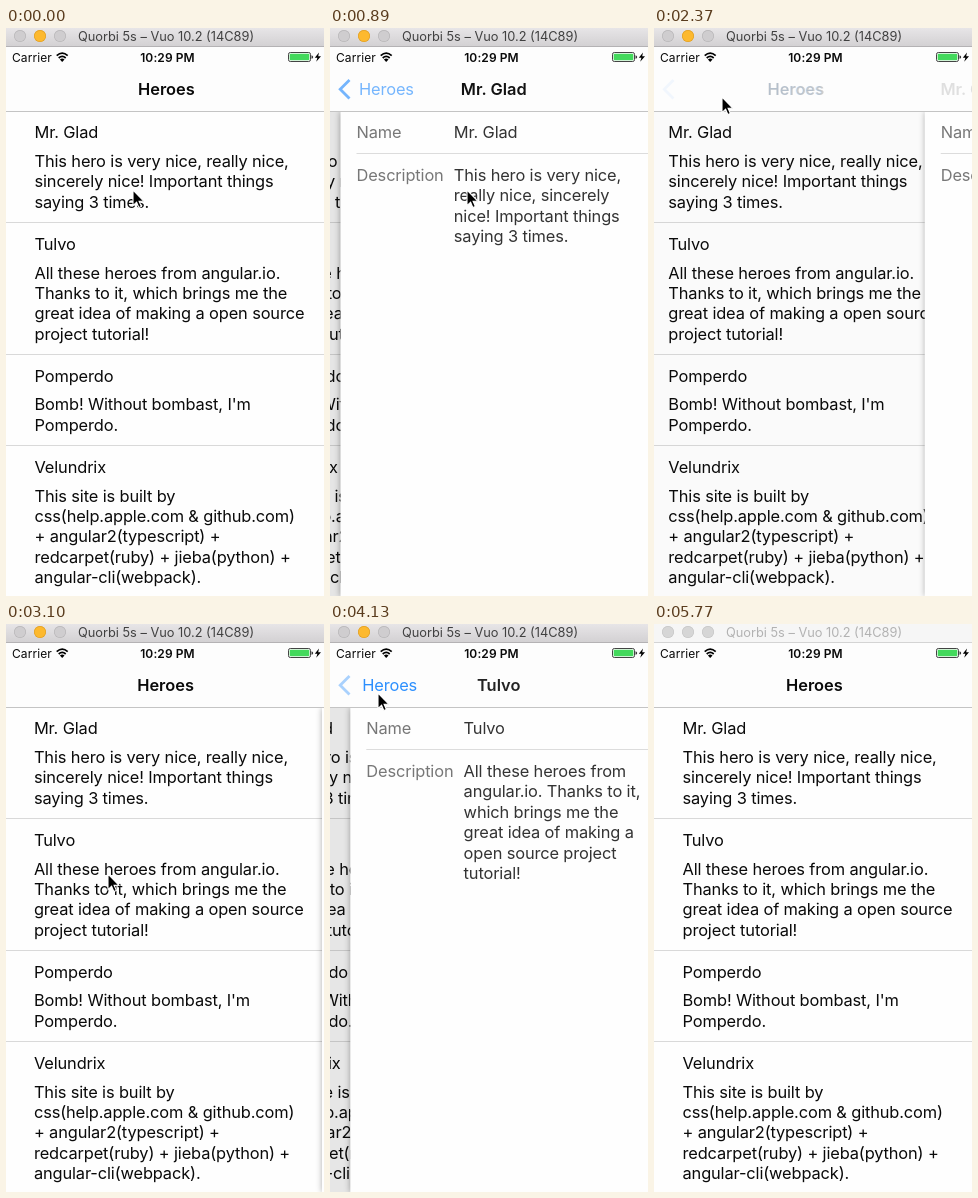
Write an HTML page that moves like this. It is 318 px wide and 568 px high and loops after 5870 ms.

```html
<!DOCTYPE html>
<html lang="en">
<head>
<meta charset="utf-8">
<title>Heroes</title>
<style>
html, body { margin: 0; width: 100%; height: 100%; overflow: hidden; background: #fff; }
#stage {
  position: relative; width: 318px; height: 568px; overflow: hidden; background: #fefefe;
  font: 16.4px/20.4px Inter, "Liberation Sans", sans-serif; letter-spacing: -.13px;
  color: #0a0a0a; white-space: pre;
}
#stage div, #stage svg { position: absolute; }

#list { left: 0; top: 83.2px; width: 318px; }
#list .row { position: static; padding: 11px 0 9.5px 28.5px; border-bottom: 1px solid #d9d9d9; }
#list .row div { position: static; }
#list .name { margin-bottom: 8.4px; }

#dim, #panel { left: 0; top: 84px; width: 318px; height: 484px; }
#dim { background: #000; }
#panel { background: #fefefe; box-shadow: 0 0 6px rgba(0, 0, 0, .32); color: #333; }
#panel .label { left: 16px; color: #777; }
#panel .value { left: 113.3px; }
#panel .first { top: 10px; }
#panel .second { top: 53px; }
#panel .rule { left: 16px; top: 41px; width: 302px; height: 1px; background: #dcdcdc; }

#nav { left: 0; top: 19px; width: 318px; height: 64px; background: #fdfdfd; border-bottom: 1px solid #c4c4c4; }
#nav .title { left: 0; top: 32px; font-weight: 600; letter-spacing: 0; }
#nav #detailTitle { width: 318px; text-align: center; }
#back { left: 0; top: 32px; color: #1483fe; }
#chevron { left: 8px; top: 32px; }
.status { left: 6px; top: 1px; font-size: 12px; letter-spacing: .1px; }
#nav .clock { left: 0; width: 323px; text-align: center; font-weight: 600; }

#bar {
  left: 0; top: 0; width: 318px; height: 18px; border-bottom: 1px solid #b4b2b4;
  background: linear-gradient(#e7e5e7, #d3d1d3); color: #404040;
}
#bar .caption {
  left: 1px; top: 0; width: 318px; text-align: center;
  font-size: 12.8px; line-height: 17px; letter-spacing: 0;
}
.dot { top: 2px; width: 12px; height: 12px; border-radius: 50%; background: #cfcdcf; box-shadow: inset 0 0 0 .7px #b9b7b9; }
.dot.amber { background: #fdb92e; box-shadow: inset 0 0 0 .7px #e0a028; }
#bar.idle { background: #f6f6f6; border-color: #d4d4d4; color: #b2b2b2; }
#bar.idle .dot { background: #d6d6d6; box-shadow: inset 0 0 0 .7px #c8c8c8; }
#cursor { left: -1px; top: -1px; }
</style>
</head>
<body>
<div id="stage">
  <div id="list"></div>
  <div id="dim"></div>
  <div id="panel">
    <div class="label first">Name</div>
    <div class="value first" id="heroName"></div>
    <div class="rule"></div>
    <div class="label second">Description</div>
    <div class="value second" id="heroText"></div>
  </div>

  <div id="nav">
    <div class="status">Carrier</div>
    <div class="status clock">10:29 PM</div>
    <svg width="318" height="20" style="left:0;top:0">
      <path d="M50.7 8.6Q56.2 3.6 61.7 8.6M52.7 11Q56.2 7.8 59.7 11" fill="none" stroke="#000" stroke-width="1.7"/>
      <path d="M53.9 12.4Q56.2 10.6 58.5 12.4L56.2 15Z"/>
      <rect x="282.5" y="5.5" width="22" height="9" rx="1.8" fill="none" stroke="#444"/>
      <rect x="283.7" y="6.7" width="19.6" height="6.6" rx=".8" fill="#43d95c"/>
      <path d="M305.5 8.2Q307.2 8.6 307.2 10T305.5 11.8Z" fill="#333"/>
      <path d="M313 5.5L308.8 10.8H311.4L310.2 14.8L315 9.2H312.2Z"/>
    </svg>
    <svg id="chevron" width="14" height="21">
      <path d="M11.5 1L2.2 10.3L11.5 19.6" fill="none" stroke="#1483fe" stroke-width="2.8"/>
    </svg>
    <div id="back">Heroes</div>
    <div class="title" id="homeTitle">Heroes</div>
    <div class="title" id="detailTitle"></div>
  </div>

  <div id="bar">
    <div class="dot" style="left:7.5px"></div>
    <div class="dot amber" style="left:27.7px"></div>
    <div class="dot" style="left:47.8px"></div>
    <div class="caption">Quorbi 5s – Vuo 10.2 (14C89)</div>
  </div>

  <svg id="cursor" width="14" height="21">
    <path d="M1 1V16.6L4.6 13.2L6.9 18.6L9.4 17.5L7.1 12.3H12Z" stroke="#fff" stroke-width="1.1"/>
  </svg>
</div>

<script>
const LOOP = 5870, TICK = 147.4, WIDTH = 318;
const $ = id => document.getElementById(id);

const heroes = [
  { name: 'Mr. Glad',
    text: 'This hero is very nice, really nice,\nsincerely nice! Important things\nsaying 3 times.',
    detail: 'This hero is very nice,\nreally nice, sincerely\nnice! Important things\nsaying 3 times.' },
  { name: 'Tulvo',
    text: 'All these heroes from angular.io.\nThanks to it, which brings me the\ngreat idea of making a open source\nproject tutorial!',
    detail: 'All these heroes from\nangular.io. Thanks to it,\nwhich brings me the\ngreat idea of making a\nopen source project\ntutorial!' },
  { name: 'Pomperdo',
    text: "Bomb! Without bombast, I'm\nPomperdo." },
  { name: 'Velundrix',
    text: 'This site is built by\ncss(help.apple.com & github.com)\n+ angular2(typescript) +\nredcarpet(ruby) + jieba(python) +\nangular-cli(webpack).' },
];

// All times below are in ticks: the screen refreshes once per tick
const visits = [
  { hero: heroes[0], push: 4, pop: 15, end: 22 },
  { hero: heroes[1], push: 23, pop: 28, end: 32 },
];
const glides = [
  { from: 0, to: 1, x: 137, y: 162 },
  { from: 6, to: 10, x: 48, y: 81 },
  { from: 12, to: 13, x: 68, y: 69 },
  { from: 16, to: 20, x: 102, y: 250 },
  { from: 23, to: 26, x: 48, y: 69 },
  { from: 28, to: 32, x: 300, y: 620 },
  { from: 34, to: 35, x: 283, y: 563 },
  { from: 35, to: 36, x: 300, y: 620 },
];
const IDLE = 39;

const ramp = (t, start, length) => Math.min(1, Math.max(0, (t - start) / length));
const smooth = u => u * u * (3 - 2 * u);
// Share of the way still to go on a critically damped spring
const spring = t => (1 + .0205 * t) * Math.exp(-.0205 * t);

const moveTo = (id, x, y = 0) => $(id).style.transform = `translate(${x}px, ${y}px)`;
const fade = (id, value) => $(id).style.opacity = value;
const setText = (id, text) => { if ($(id).textContent !== text) $(id).textContent = text; };

function addBox(parent, className, text = '') {
  const box = document.createElement('div');
  box.className = className;
  box.textContent = text;
  return parent.appendChild(box);
}

for (const { name, text } of heroes) {
  const row = addBox($('list'), 'row');
  addBox(row, 'name', name);
  addBox(row, 'text', text);
}

function drawScreen(tick) {
  const visit = visits.find(v => tick < v.end);
  const popping = visit && tick >= visit.pop;
  const { hero, push, pop } = visit || { hero: heroes[0], push: tick };
  const t = popping ? (tick - pop) * TICK + 20 : Math.max(0, (tick - push) * TICK - 39);

  // A popped panel stays 2px short of the edge until the transition ends
  const x = popping ? (WIDTH - 2) * (1 - spring(t)) : WIDTH * spring(t);
  const u = x / WIDTH;
  const leaving = 1 - ramp(t, 0, 190);
  const arriving = ramp(t, 145, 115);
  const appearing = ramp(t, 140, 200);

  setText('heroName', hero.name);
  setText('heroText', hero.detail);
  setText('detailTitle', hero.name);

  moveTo('panel', x);
  $('panel').style.visibility = u < 1 ? 'visible' : 'hidden';
  moveTo('list', -.3 * (WIDTH - x));
  fade('dim', .1 * (1 - u));

  const labelX = 25.5 + 106.5 * u - 24 * u * u * (1 - u);
  moveTo('homeTitle', labelX);
  moveTo('back', labelX);
  moveTo('detailTitle', .372 * x ** 1.083);
  fade('homeTitle', popping ? arriving : leaving);
  fade('detailTitle', popping ? leaving : arriving);
  fade('back', popping ? leaving : appearing);
  fade('chevron', popping ? .4 * leaving : appearing);
}

function drawCursor(tick) {
  let x = 127, y = 162;
  for (const glide of glides) {
    const u = smooth(ramp(tick, glide.from, glide.to - glide.from));
    x += (glide.x - x) * u;
    y += (glide.y - y) * u;
  }
  moveTo('cursor', Math.round(x), Math.round(y));
}

const begin = performance.now();
function frame() {
  const tick = Math.floor((performance.now() - begin) % LOOP / TICK);
  drawScreen(tick);
  drawCursor(tick);
  $('bar').classList.toggle('idle', tick >= IDLE);
  requestAnimationFrame(frame);
}
frame();
</script>
</body>
</html>
```
